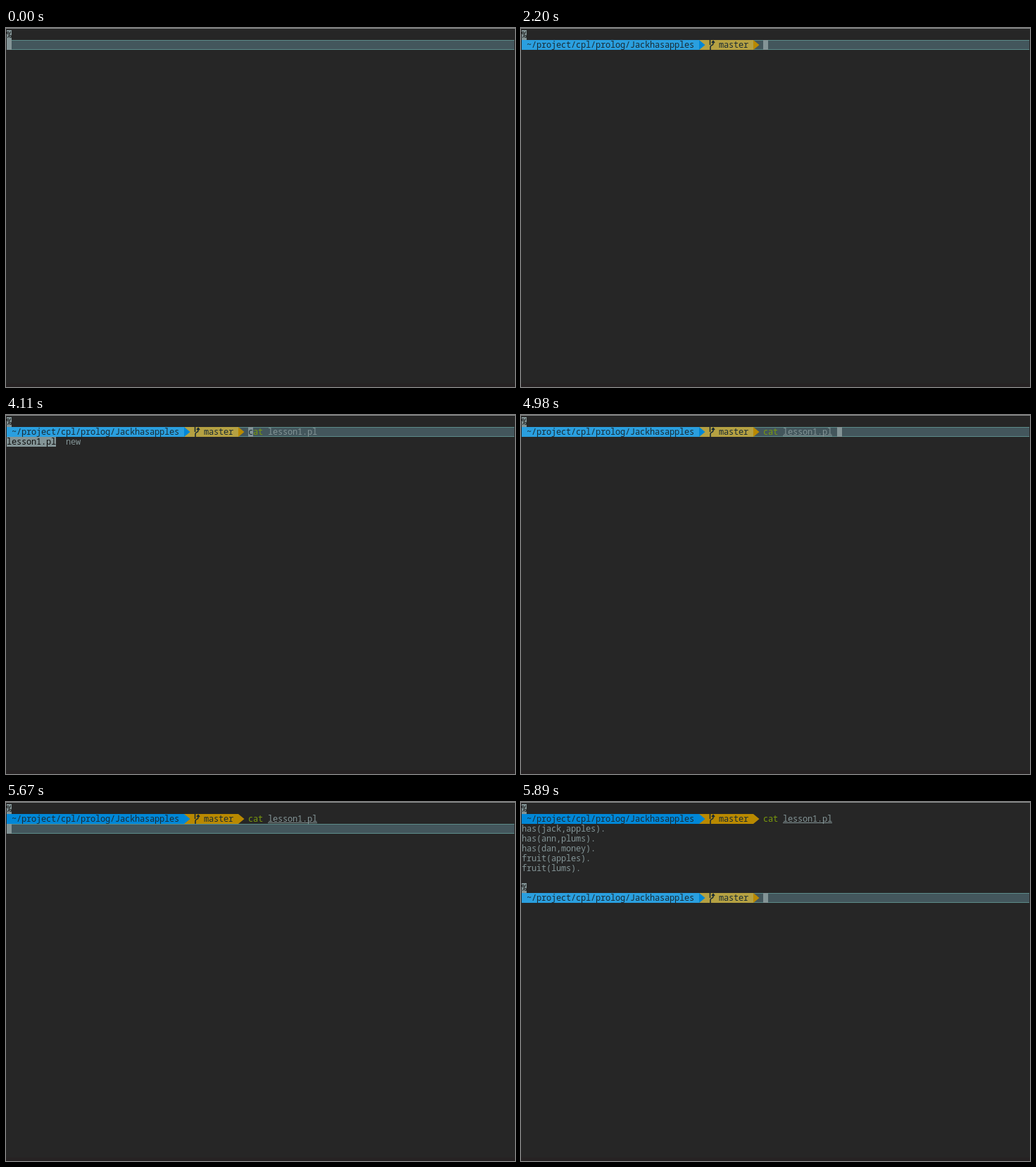
An HTML page that plays this animation: 723x509 px, repeating every 8 s.

```html
<!DOCTYPE html>
<html lang="en">
<head>
<meta charset="utf-8">
<title>Terminal session</title>
<style>
  html, body { margin: 0; width: 100%; height: 100%; overflow: hidden; background: #262626; }
  svg { display: block; width: 723px; height: 509px; }
  text {
    font: 12px "Noto Sans Mono", "DejaVu Sans Mono", monospace;
    letter-spacing: -0.2px;
    white-space: pre;
  }
</style>
</head>
<body>
<svg id="screen" viewBox="0 0 723 509" xmlns="http://www.w3.org/2000/svg"></svg>
<script>
const LOOP = 8000;
const CELL_W = 7, CELL_H = 14, LEFT = 1, TOP = 3;
const COLOR = {
  back: '#262626', foot: '#262223', edge: '#888a8a',
  guide: '#43565c', guideLine: '#5c8b89',
  gray: '#839496', green: '#7a9a0c', red: '#dc322f',
  blue: '#0087d7', blueLit: '#2a9fdf',
  gold: '#b98900', goldLit: '#b5a142',
  ink: '#192b34', black: '#0c0c0c'
};
const INPUT_COL = 49;

const px = col => LEFT + col * CELL_W;
const py = row => TOP + row * CELL_H;

const rect = (x, y, w, h, fill) =>
  `<rect x="${x}" y="${y}" width="${w}" height="${h}" fill="${fill}"/>`;
const cells = (col, row, n, fill) => rect(px(col), py(row), n * CELL_W, CELL_H, fill);
const text = (col, row, str, fill, weight = 400) =>
  `<text x="${px(col)}" y="${py(row) + 11}" fill="${fill}" font-weight="${weight}">${str}</text>`;
const bright = (col, row, str, fill = COLOR.gray) => text(col, row, str, fill, 600);
const cursor = (col, row) => cells(col, row, 1, COLOR.gray);

function guide(row) {
  const y = py(row);
  return rect(1, y, 721, CELL_H, COLOR.guide) +
    rect(1, y, 721, 1, COLOR.guideLine) +
    rect(1, y + CELL_H - 1, 721, 1, COLOR.guideLine);
}

const mark = row => cells(0, row, 1, COLOR.gray) + text(0, row, '%', COLOR.black, 700);

function arrow(col, row, fill) {
  const x = px(col), y = py(row);
  return `<path d="M${x} ${y}l8.5 7l-8.5 7z" fill="${fill}"/>`;
}

function branch(col, row) {
  const x = px(col), y = py(row);
  return `<path d="M${x + 1.5} ${y}v7M${x + 2} ${y + 14}v-4q0-2 2-2.5t2-2.5v-2` +
    `M${x + 4} ${y + 4}l2-2.5l2 2.5" fill="none" stroke="${COLOR.ink}" stroke-width="1.6"/>`;
}

function prompt(row, lit) {
  return cells(0, row, 36, lit ? COLOR.blueLit : COLOR.blue) +
    cells(36, row, 11, lit ? COLOR.goldLit : COLOR.gold) +
    arrow(36, row, COLOR.blue) +
    arrow(47, row, COLOR.gold) +
    text(1, row, '~/project/cpl/prolog/Jackhasapples', COLOR.ink) +
    branch(38, row) +
    text(40, row, 'master', COLOR.ink);
}

const command = (str, fill = COLOR.green) => text(INPUT_COL, 1, str, fill, 700);

function fileName(underline) {
  const col = INPUT_COL + 4;
  return bright(col, 1, 'lesson1.pl') +
    (underline ? rect(px(col), py(1) + 12, 10 * CELL_W, 1, COLOR.gray) : '');
}

const menu = picked =>
  (picked ? cells(0, 2, 10, COLOR.gray) : '') +
  (picked ? text(0, 2, 'lesson1.pl', COLOR.black) : bright(0, 2, 'lesson1.pl')) +
  bright(12, 2, 'new');

const editing = (at, body = '') =>
  mark(0) + guide(1) + prompt(1, true) + cursor(INPUT_COL + at, 1) + body;

const entered = () => mark(0) + prompt(1, false) + command('cat') + fileName(true);

const output = () => [
  'has(jack,apples).', 'has(ann,plums).', 'has(dan,money).',
  'fruit(apples).', 'fruit(lums).'
].map((line, i) => bright(0, 2 + i, line)).join('') + mark(8);

const steps = [
  [0, () => mark(0) + guide(1) + cursor(0, 1)],
  [80, () => editing(0)],
  [2310, () => editing(1, command('c', COLOR.red))],
  [2540, () => editing(3, command('cat'))],
  [3420, () => editing(4, command('cat') + menu(false))],
  [4110, () => editing(0, command('c', COLOR.ink) +
    text(INPUT_COL + 1, 1, 'at', COLOR.green, 700) + fileName(false) + menu(true))],
  [4980, () => editing(15, command('cat') + fileName(true))],
  [5570, () => editing(14, command('cat') + fileName(true))],
  [5670, () => entered() + guide(2) + cursor(0, 2)],
  [5770, () => entered() + output() + guide(9) + cursor(0, 9)],
  [5890, () => entered() + output() + guide(9) + prompt(9, true) + cursor(INPUT_COL, 9)]
];

const frame = rect(0, 0, 723, 509, COLOR.back) +
  rect(0, 0, 723, 1, COLOR.edge) + rect(0, 504, 723, 5, COLOR.foot);
const screen = document.getElementById('screen');
const start = performance.now();
let shown = -1;

function draw(now) {
  const t = Math.max(0, now - start) % LOOP;
  const index = steps.filter(([at]) => at <= t).length - 1;
  if (index !== shown) {
    screen.innerHTML = frame + steps[index][1]();
    shown = index;
  }
  requestAnimationFrame(draw);
}
draw(start);
</script>
</body>
</html>
```
